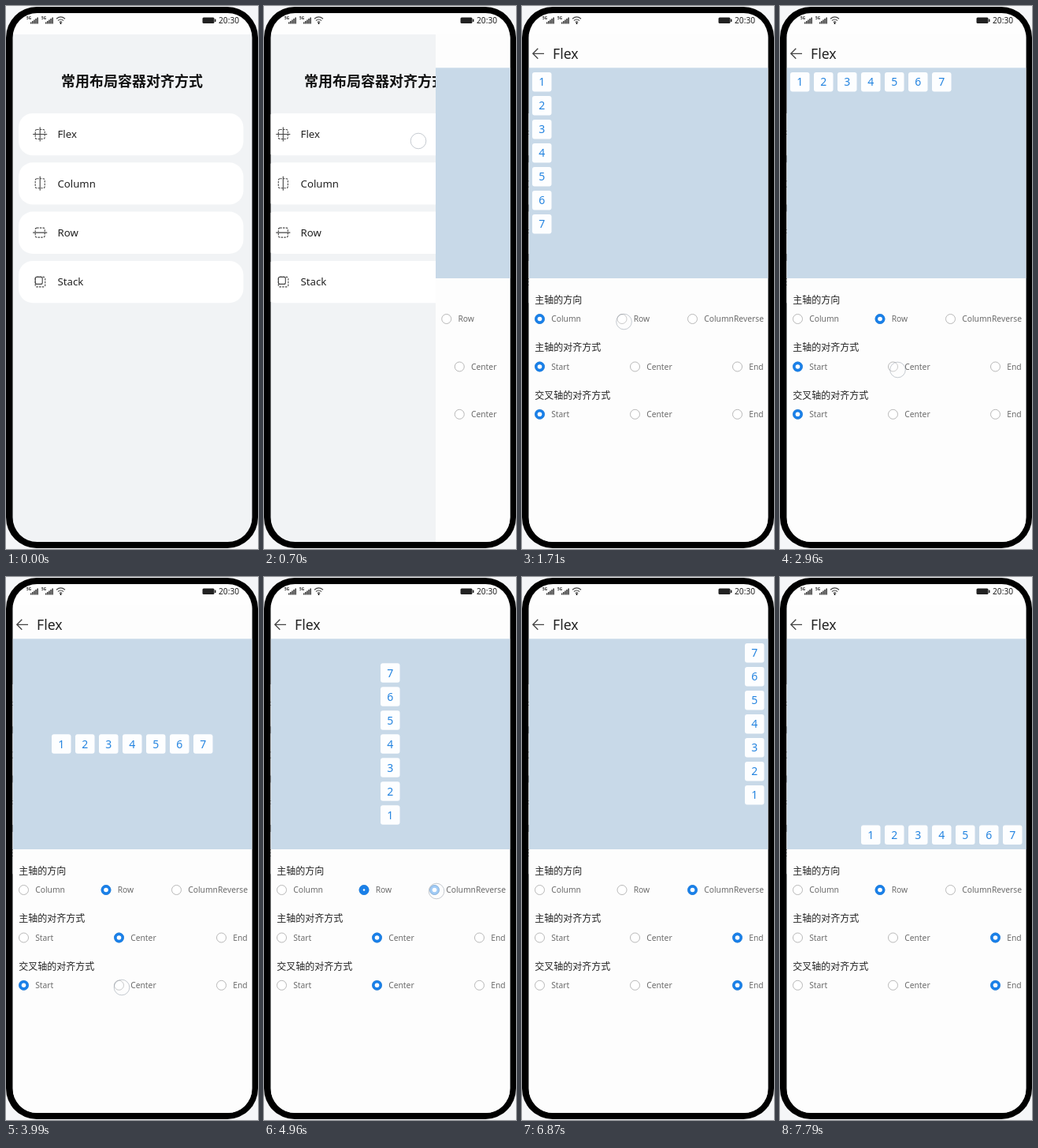
Recreate the animation shown at these times as an HTML page. Size 320 by 688 pixels, loop 8000 ms.

```html
<!DOCTYPE html>
<html lang="zh-CN">
<head>
<meta charset="utf-8">
<title>Alignment demo</title>
<style>
  html, body { margin: 0; width: 100%; height: 100%; overflow: hidden; background: #f5f6f8; }
  svg { display: block; width: 100%; height: 100%; }
  text { font-family: 'Noto Sans', 'Noto Sans CJK SC', 'Noto Sans CJK', sans-serif; fill: #222; }
  .cjk { font-family: 'Noto Sans CJK SC', 'Noto Sans CJK', 'Noto Sans CJK JP', sans-serif; }
  .title { font-size: 18px; font-weight: 700; text-anchor: middle; fill: #111; }
  .section { font-size: 12px; font-weight: 500; }
  .entry { font-size: 13.2px; }
  .label { font-size: 10.3px; fill: #6c6c6c; }
  .digit { font-size: 14px; font-weight: 500; text-anchor: middle; fill: #2484e0; }
  .line { fill: none; stroke: #444; stroke-width: 1.1; }
  .dash { stroke-dasharray: 2.4 1.3; }
</style>
</head>
<body>
<svg viewBox="0 0 320 688"></svg>
<script>
const LOOP = 8000, SCREEN_X = 8.5, SCREEN_W = 304, CELL = 24.5, PITCH = 30;
const SLIDE = { start: 560, length: 380 };
const RADIO_TIME = 150;

const groups = [
  { title: '主轴的方向', y: 396.5, options: [['Column', 22.5], ['Row', 127], ['ColumnReverse', 216.5]] },
  { title: '主轴的对齐方式', y: 457, options: [['Start', 22.5], ['Center', 143.5], ['End', 273.5]] },
  { title: '交叉轴的对齐方式', y: 517.3, options: [['Start', 22.5], ['Center', 143.5], ['End', 273.5]] },
];

// Each tap: press time, click time, position and the option it chooses.
const taps = [
  { press: 500, click: 560, x: 196, y: 171 },
  { press: 1710, click: 1760, x: 129.5, y: 400, group: 0, option: 1 },
  { press: 2960, click: 3010, x: 149.5, y: 461, group: 1, option: 1 },
  { press: 3940, click: 3990, x: 147, y: 520, group: 2, option: 1 },
  { press: 4880, click: 4920, x: 219, y: 398, group: 0, option: 2 },
  { press: 5700, click: 5750, x: 283, y: 460, group: 1, option: 2 },
  { press: 6360, click: 6460, x: 277, y: 522, group: 2, option: 2 },
  { press: 7190, click: 7260, x: 131, y: 398, group: 0, option: 1 },
];

const clamp = v => Math.max(0, Math.min(1, v));
const smooth = v => v * v * (3 - 2 * v);
const text = (cls, x, y, s) => `<text class="${cls}" x="${x}" y="${y}">${s}</text>`;
const rect = (x, y, w, h, r, attrs) =>
  `<rect x="${x}" y="${y}" width="${w}" height="${h}" rx="${r}" ${attrs}/>`;
const repeat = (n, draw) => Array.from({ length: n }, (_, i) => draw(i)).join('');

const signal = x =>
  `<text x="${x}" y="17.3" font-size="4.6" font-weight="700">5G</text>` +
  repeat(5, i => rect(x + 5 + i * 2.1, 20.5 - i * 1.5, 1.4, 2 + i * 1.5, 0, 'fill="#222"'));

const statusBar = rect(0, 0, 320, 36, 0, 'fill="#fefefe"') + signal(26) + signal(45) +
  `<g class="line" style="stroke-width:1.2"><path d="M64 16.2Q69.5 11.6 75 16.2M66 18.5Q69.5 15.5 73 18.5M67.8 20.6Q69.5 19.2 71.2 20.6"/></g>
   <circle cx="69.5" cy="22" r="1"/>` +
  rect(249.5, 14.5, 15, 7.5, 1.5, 'fill="#222"') + rect(265, 16.5, 1.5, 3.5, 0.5, 'fill="#222"') +
  '<text x="270" y="21.6" font-size="10.2">20:30</text>';

const dashedBox = rect(-6, -6, 12, 12, 2, 'class="line dash"');
const entries = [
  ['Flex', dashedBox + '<path class="line" d="M-9 0H9M0-9V9"/>'],
  ['Column', dashedBox + '<path class="line" d="M0-9V9"/>'],
  ['Row', dashedBox + '<path class="line" d="M-9 0H9"/>'],
  ['Stack', rect(-6, -6, 12.5, 12.5, 2, 'class="line dash"') +
    rect(-6, -6, 9, 9, 2, 'class="line" fill="#fff"')],
];
const menu = rect(0, 36, 400, 650, 0, 'fill="#f1f3f5"') +
  text('cjk title', 160, 101.5, '常用布局容器对齐方式') +
  entries.map(([name, icon], i) => {
    const y = 136 + i * 62.3;
    return rect(16, y, 285.5, 53.3, 18, 'fill="#fff"') +
      `<g transform="translate(43.2 ${y + 26.5})">${icon}</g>` + text('entry', 65.5, y + 31.2, name);
  }).join('');

const radio = ([name, x], y) => `<g class="radio">
  <circle cx="${x}" cy="${y}" r="6" fill="#fff" stroke="#b0b0b0" stroke-width=".9"/>
  <circle class="disc" cx="${x}" cy="${y}" r="6.4" fill="#1a80e8"/>
  <circle class="dot" cx="${x}" cy="${y}" fill="#fff"/></g>` + text('label', x + 14.7, y + 3.8, name);

const page = rect(SCREEN_X, 36, SCREEN_W, 650, 0, 'fill="#fdfdfd"') +
  '<path class="line" style="stroke-width:1.3" d="M28 60.3H14M20.3 53.8L13.8 60.3L20.3 66.8"/>' +
  '<text x="39" y="66.6" font-size="17.6">Flex</text>' +
  rect(SCREEN_X, 78.3, SCREEN_W, 266.7, 0, 'fill="#c8d9e8"') +
  repeat(7, i => `<g class="cell">${rect(0, 0, CELL, CELL, 3, 'fill="#fdfeff"')}${text('digit', CELL / 2, 17.3, i + 1)}</g>`) +
  groups.map(g => text('cjk section', 16.3, g.y - 19.6, g.title) +
    g.options.map(o => radio(o, g.y)).join('')).join('');

const svg = document.querySelector('svg');
svg.innerHTML = `
  <defs>
    <clipPath id="screen">${rect(SCREEN_X, 9, SCREEN_W, 670, 31, '')}</clipPath>
    <clipPath id="reveal">${rect(0, 36, 400, 650, 0, 'id="edge"')}</clipPath>
  </defs>
  ${rect(0, 0, 320, 688, 0, 'fill="#f5f6f8"')}
  ${rect(0, 1, 320, 686, 39, 'fill="#000"')}
  <g clip-path="url(#screen)">
    <g id="menu">${menu}</g>
    <g clip-path="url(#reveal)"><g id="page">${page}</g></g>
    ${statusBar}
  </g>
  <circle id="touch" r="9.8" fill="#fff" fill-opacity=".25" stroke="#8e98a4" stroke-opacity=".5" stroke-width="1"/>`;

const $ = id => document.getElementById(id);
const cells = [...svg.querySelectorAll('.cell')];
const radios = [...svg.querySelectorAll('.radio')];
const move = (el, x, y = 0) => el.setAttribute('transform', `translate(${x} ${y})`);

function choice(group, t) {
  const made = taps.filter(p => p.group === group && p.click <= t);
  const history = [{ option: 0, click: -LOOP }, ...made];
  const current = history.at(-1);
  return {
    option: current.option,
    previous: history.at(-2)?.option,
    progress: clamp((t - current.click) / RADIO_TIME),
  };
}

function drawRadios(choices) {
  radios.forEach((el, k) => {
    const c = choices[Math.floor(k / 3)], i = k % 3;
    let opacity = 0, dot = 0;
    if (i === c.option) {
      opacity = clamp(2 * c.progress);
      dot = 2.8;
    } else if (i === c.previous) {
      opacity = clamp(2 - 2 * c.progress);
      dot = 2.8 * clamp(1 - 2 * c.progress);
    }
    el.querySelector('.disc').setAttribute('opacity', opacity);
    el.querySelector('.dot').setAttribute('r', dot);
  });
}

function drawCells([direction, main, cross]) {
  const isRow = direction.option === 1, reversed = direction.option === 2;
  const left = 13, top = 84, width = 294.5, height = 255;
  const [mainSize, crossSize] = isRow ? [width, height] : [height, width];
  const share = reversed ? 1 - main.option / 2 : main.option / 2;
  const mainStart = (mainSize - 6 * PITCH - CELL) * share;
  const crossStart = (crossSize - CELL) * cross.option / 2;
  cells.forEach((el, i) => {
    const along = mainStart + PITCH * (reversed ? 6 - i : i);
    move(el, left + (isRow ? along : crossStart), top + (isRow ? crossStart : along));
  });
}

function drawTouch(t) {
  const tap = taps.findLast(p => p.press <= t);
  $('touch').setAttribute('opacity', tap ? clamp((tap.click + 260 - t) / 100) : 0);
  if (tap) move($('touch'), tap.x, tap.y);
}

function draw(t) {
  const shown = smooth(clamp((t - SLIDE.start) / SLIDE.length));
  const rest = SCREEN_W * (1 - shown);
  move($('menu'), -0.2 * SCREEN_W * shown);
  move($('page'), rest / 2);
  $('edge').setAttribute('x', SCREEN_X + rest);
  const choices = groups.map((_, g) => choice(g, t));
  drawRadios(choices);
  drawCells(choices);
  drawTouch(t);
}

const begin = performance.now();
function frame() {
  draw((performance.now() - begin) % LOOP);
  requestAnimationFrame(frame);
}
frame();
</script>
</body>
</html>
```
